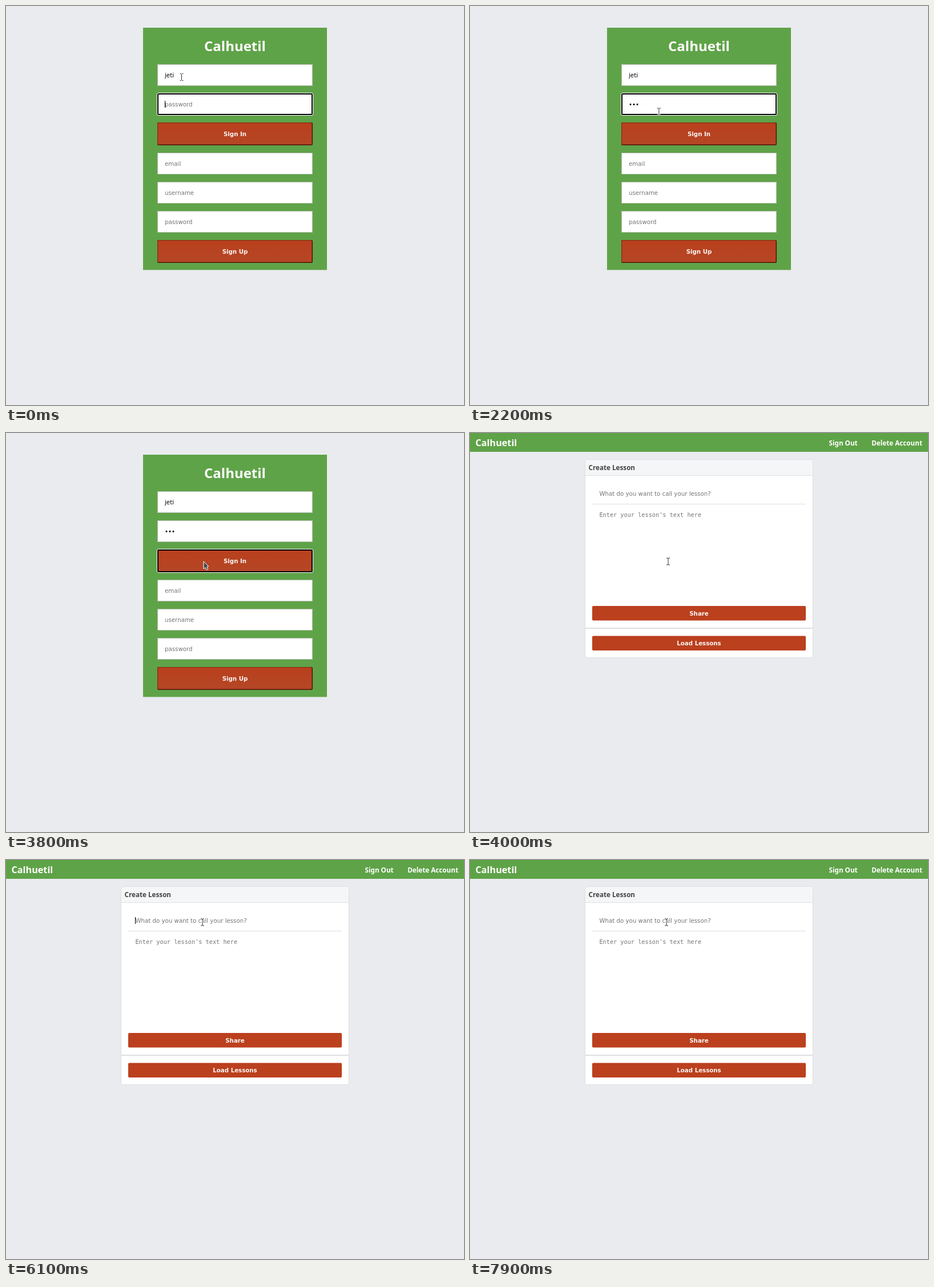
These frames come from a looping animation (802x699 px, 8 s). An HTML page:

```html
<!DOCTYPE html>
<html lang="en">
<head>
<meta charset="utf-8">
<title>Lesson sign in</title>
<style>
  html, body { margin: 0; width: 100%; height: 100%; overflow: hidden; background: #e9ebee; }
  svg { display: block; width: 802px; height: 699px; }
  text { font: 10.24px "DejaVu Sans", sans-serif; white-space: pre; }
  .hint { fill: #757575; }
  .mono { font-family: "DejaVu Sans Mono", monospace; }
  .label { font-weight: bold; fill: #fbf5f3; text-anchor: middle; }
  .head { font: bold 11.7px "Noto Sans", sans-serif; fill: #fff; }
  .brand { font-size: 16.2px; }
  .title { font-size: 24px; text-anchor: middle; }
</style>
</head>
<body>
<svg viewBox="0 0 802 699">
  <defs>
    <linearGradient id="red" x2="0" y2="1">
      <stop stop-color="#b9401d"/><stop offset="1" stop-color="#b54626"/>
    </linearGradient>
  </defs>
  <g id="login">
    <rect x="240" y="38" width="322" height="424.4" fill="#5fa348"/>
    <text class="head title" x="401" y="79">Calhuetil</text>
    <g id="form"></g>
    <g id="ring" fill="none">
      <rect x="264.5" y="152.5" width="273" height="39" rx="2.5" stroke="#fff"/>
      <rect id="inner" x="266" y="154" width="270" height="36" rx="1.5" stroke="#000" stroke-width="2"/>
    </g>
  </g>
  <g id="home">
    <rect width="802" height="33" fill="#5fa348"/>
    <text class="head brand" x="9.5" y="23">Calhuetil</text>
    <text class="head" x="628.5" y="22">Sign Out</text>
    <text class="head" x="792" y="22" text-anchor="end">Delete Account</text>
    <rect x="201.5" y="46.5" width="399" height="347" rx="3.5" fill="#fff" stroke="#dddfe2"/>
    <path d="M202 74V50q0-3 3-3H597q3 0 3 3V74Z" fill="#f5f6f7"/>
    <path d="M202 74.5H600M214 124.5H588" stroke="#dddfe2"/>
    <path d="M202 342H600" stroke="#dddfe2" stroke-width="2"/>
    <text class="head" x="207.5" y="65" style="fill:#444">Create Lesson</text>
    <text class="hint" x="226.4" y="109.5">What do you want to call your lesson?</text>
    <text class="hint mono" x="226.4" y="147">Enter your lesson's text here</text>
    <rect x="214" y="303" width="374" height="25.6" rx="2" fill="#bb401e"/>
    <rect x="214" y="355.5" width="374" height="25.6" rx="2" fill="#bb401e"/>
    <text class="label" x="401" y="319.5">Share</text>
    <text class="label" x="401" y="372">Load Lessons</text>
  </g>
  <rect id="caret" width="1" height="12"/>
  <g id="beam" fill="none">
    <path id="stem" d="M-3-6H-1L0-5 1-6H3M0-5V5M-3 6H-1L0 5 1 6H3" stroke="#fff" stroke-width="2.4"/>
    <use href="#stem" style="stroke:#333"/>
    <path d="M-3-6H-1L0-5 1-6H3M0-5V5M-3 6H-1L0 5 1 6H3" stroke="#333"/>
  </g>
  <path id="arrow" d="M0 .8V14L3.2 11.8 5.2 15.8 7.6 14.8 6 10.4 8.8 9.8Z" fill="#444a4c" stroke="#fff" stroke-linejoin="round"/>
</svg>
<script>
const $ = id => document.getElementById(id);
const show = (el, on) => el.style.display = on ? "" : "none";

const field = (y, text, attrs = 'class="hint"') =>
  `<rect x="265.5" y="${y + .5}" width="271" height="37" fill="#fff" stroke="#b3bbae"/>
   <text ${attrs} x="278" y="${y + 23}">${text}</text>`;

const button = (y, text) =>
  `<rect x="265" y="${y}" width="272" height="40" rx="2" fill="#480f04"/>
   <rect x="265" y="${y}" width="270.5" height="38.5" rx="2" fill="#8b2b11"/>
   <rect x="266.2" y="${y + 1.2}" width="269.3" height="37.3" fill="url(#red)"/>
   <text class="label" x="401" y="${y + 24}">${text}</text>`;

$("form").innerHTML =
  field(102, "jeti", "") + field(153, "password", 'id="pass"') + button(204, "Sign In") +
  field(257, "email") + field(308, "username") + field(359, "password") + button(410, "Sign Up");

const keys = [600, 700, 1300];           // password key presses
const step = (t, from, to) => {          // eased progress in 100 ms ticks
  const p = Math.min(1, Math.max(0, (Math.floor(t / 100) * 100 - from) / (to - from)));
  return p * p * (3 - 2 * p);
};
const curve = (a, c, b, p) => (1 - p) ** 2 * a + 2 * p * (1 - p) * c + p * p * b;

function pointer(t) {
  if (t < 4000) {
    const p = step(t, 1800, 2500);
    return [307.5 + 38.5 * p, 124.5 + 99.5 * p];
  }
  const p = step(t, 4400, 4900);
  return [curve(347, 320, 344, p), curve(225, 167, 109, p)];
}

function draw(t) {
  const home = t >= 4000;
  show($("login"), !home);
  show($("home"), home);

  const typed = keys.filter(k => t >= k).length;
  const pass = $("pass");
  pass.textContent = typed ? "•".repeat(typed) : "password";
  pass.style.fill = typed ? "#000" : "#757575";

  const pressed = t >= 3600;
  $("ring").setAttribute("transform", `translate(0 ${pressed ? 51 : 0})`);
  for (const [i, r] of [...$("ring").children].entries())
    r.setAttribute("height", (i ? 36 : 39) + (pressed ? 2 : 0));

  const lit = home
    ? t >= 6100 && Math.floor((t - 6100) / 600) % 2 === 0
    : t < 500 || (t >= 600 && t < 1900) || (t >= 2500 && t < 3100);
  const caret = $("caret");
  show(caret, lit);
  caret.setAttribute("x", home ? 226 : 278 + Math.round(typed * 6.04));
  caret.setAttribute("y", home ? 100 : 166);

  const [x, y] = pointer(t);
  const overText = home || y < 140 || (y > 153 && y < 191);
  show($("beam"), overText);
  show($("arrow"), !overText);
  $(overText ? "beam" : "arrow").setAttribute("transform", `translate(${x} ${y})`);
}

function tick() {
  draw(performance.now() % 8000);
  requestAnimationFrame(tick);
}
tick();
</script>
</body>
</html>
```
